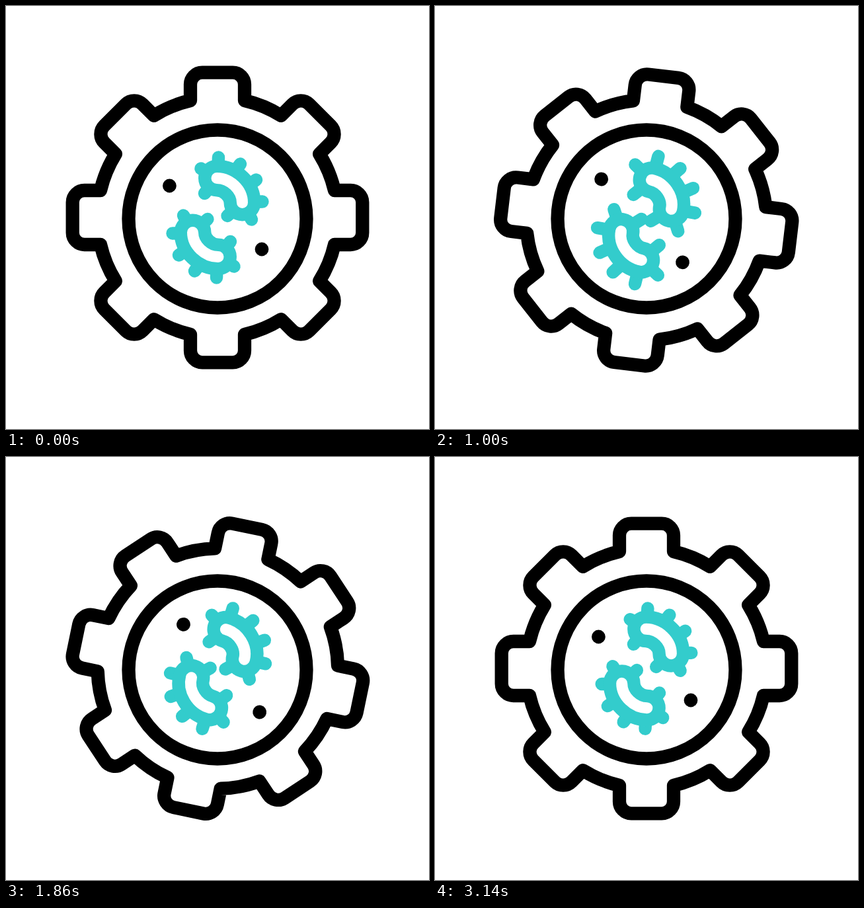
Recreate the animation shown at these times as an HTML page. Size 640 by 640 pixels, loop 3.22 s.

```html
<!DOCTYPE html>
<html lang="en">
<head>
<meta charset="utf-8">
<title>Gear with bacteria</title>
<style>
  html, body { margin: 0; width: 100%; height: 100%; overflow: hidden; background: #fff; }
  svg { display: block; width: 100vw; height: 100vh; }
  path, line, circle { stroke-linecap: round; stroke-linejoin: round; }
</style>
</head>
<body>
<svg id="stage" viewBox="0 0 640 640"></svg>
<script>
const LOOP = 3220, LAST = 3140, STEP = 20;
const TEAL = '#33cccc';
const SPIN = { start: 327, length: 2017, x1: 0.432, x2: 0.142 };
const HUB = [320, 322];
const ARC = 'M319 260.5 C339 260.5 357.5 278 357.5 297.5';
const PIVOT = [340, 277];

// Each spike: foot on the body, tip at rest.
const SPIKES = [
  [319, 261, 300.5, 283.5], [319, 261, 295, 246], [320, 261, 321.5, 229],
  [336, 264, 354.5, 239], [353, 281, 378.5, 263], [357, 297, 388, 296],
  [357, 297, 371.5, 323], [357, 297, 335, 317.5]
];

const stage = document.getElementById('stage');

function add(parent, tag, attrs) {
  const el = document.createElementNS('http://www.w3.org/2000/svg', tag);
  for (const key in attrs) el.setAttribute(key, attrs[key]);
  return parent.appendChild(el);
}

const turn = (deg, x, y) => `rotate(${deg.toFixed(3)} ${x} ${y})`;
const clamp = v => Math.min(1, Math.max(0, v));
const smooth = v => { v = clamp(v); return v * v * (3 - 2 * v); };

function gearPath() {
  let d = '';
  for (let i = 0; i < 8; i++) {
    const a = i * Math.PI / 4, c = Math.cos(a), s = Math.sin(a);
    const p = (x, y) =>
      `${(320 + x * c - y * s).toFixed(2)} ${(320 + x * s + y * c).toFixed(2)}`;
    d += (i ? 'A181.5 181.5 0 0 1 ' : 'M') + p(-41, -177)
      + 'L' + p(-41, -201) + 'A18 18 0 0 1 ' + p(-23, -219.3)
      + 'L' + p(23, -219.3) + 'A18 18 0 0 1 ' + p(41, -201)
      + 'L' + p(41, -177);
  }
  return d + 'A181.5 181.5 0 0 1 279 143Z';
}

const black = { fill: 'none', stroke: '#000', 'stroke-width': 20.3 };
add(stage, 'circle', { cx: HUB[0], cy: HUB[1], r: 134.5, ...black });
const wheel = add(stage, 'g', {});
add(wheel, 'path', { d: gearPath(), ...black });

function makeBean(flip, sway) {
  const holder = add(wheel, 'g', { transform: turn(flip, 320, 320) });
  const body = add(holder, 'g', { fill: 'none', stroke: TEAL });
  const spikes = SPIKES.map(([x1, y1]) =>
    add(body, 'line', { x1, y1, 'stroke-width': 19.4 }));
  add(body, 'path', { d: ARC, 'stroke-width': 56 });
  add(body, 'path', { d: ARC, 'stroke-width': 17, stroke: '#fff' });
  return { body, spikes, sway };
}

const beans = [makeBean(0, 6.5), makeBean(180, 8)];
const dots = [0, 1].map(() => add(wheel, 'circle', { r: 10.4 }));

function spinAt(t) {
  const x = clamp((t - SPIN.start) / SPIN.length);
  let lo = 0, hi = 1;
  for (let i = 0; i < 30; i++) {
    const s = (lo + hi) / 2, r = 1 - s;
    const v = 3 * SPIN.x1 * s * r * r + 3 * SPIN.x2 * s * s * r + s * s * s;
    if (v < x) lo = s; else hi = s;
  }
  return -360 * smooth(lo);
}

function place(dot, x, y) {
  dot.setAttribute('cx', x);
  dot.setAttribute('cy', y);
}

function draw(t) {
  wheel.setAttribute('transform', turn(spinAt(t), ...HUB));

  const phase = 2 * Math.PI * t / 900;
  const grow = 3.5 * (1 - Math.cos(2 * Math.PI * t / (LAST / 2)));
  for (const bean of beans) {
    bean.body.setAttribute('transform', turn(bean.sway * Math.sin(phase), ...PIVOT));
    bean.spikes.forEach((line, i) => {
      const [x1, y1, x2, y2] = SPIKES[i];
      const k = grow / Math.hypot(x2 - x1, y2 - y1);
      line.setAttribute('x2', x2 + (x2 - x1) * k);
      line.setAttribute('y2', y2 + (y2 - y1) * k);
    });
  }

  // The dots drift while the wheel turns, then rest.
  const drift = Math.sin(phase + 0.4);
  const out = smooth(t / 450) * smooth((2200 - t) / 400);
  place(dots[0], 247.4 + out * 12 * drift, 272 - out * 10 * drift);
  place(dots[1], 387 + out * (13 - 5.7 * drift), 368 + out * (9 * drift - 2.5));
}

const begin = performance.now();
function tick() {
  const t = (performance.now() - begin) % LOOP;
  draw(Math.min(LAST, Math.floor(t / STEP) * STEP));
  requestAnimationFrame(tick);
}
draw(0);
requestAnimationFrame(tick);
</script>
</body>
</html>
```
